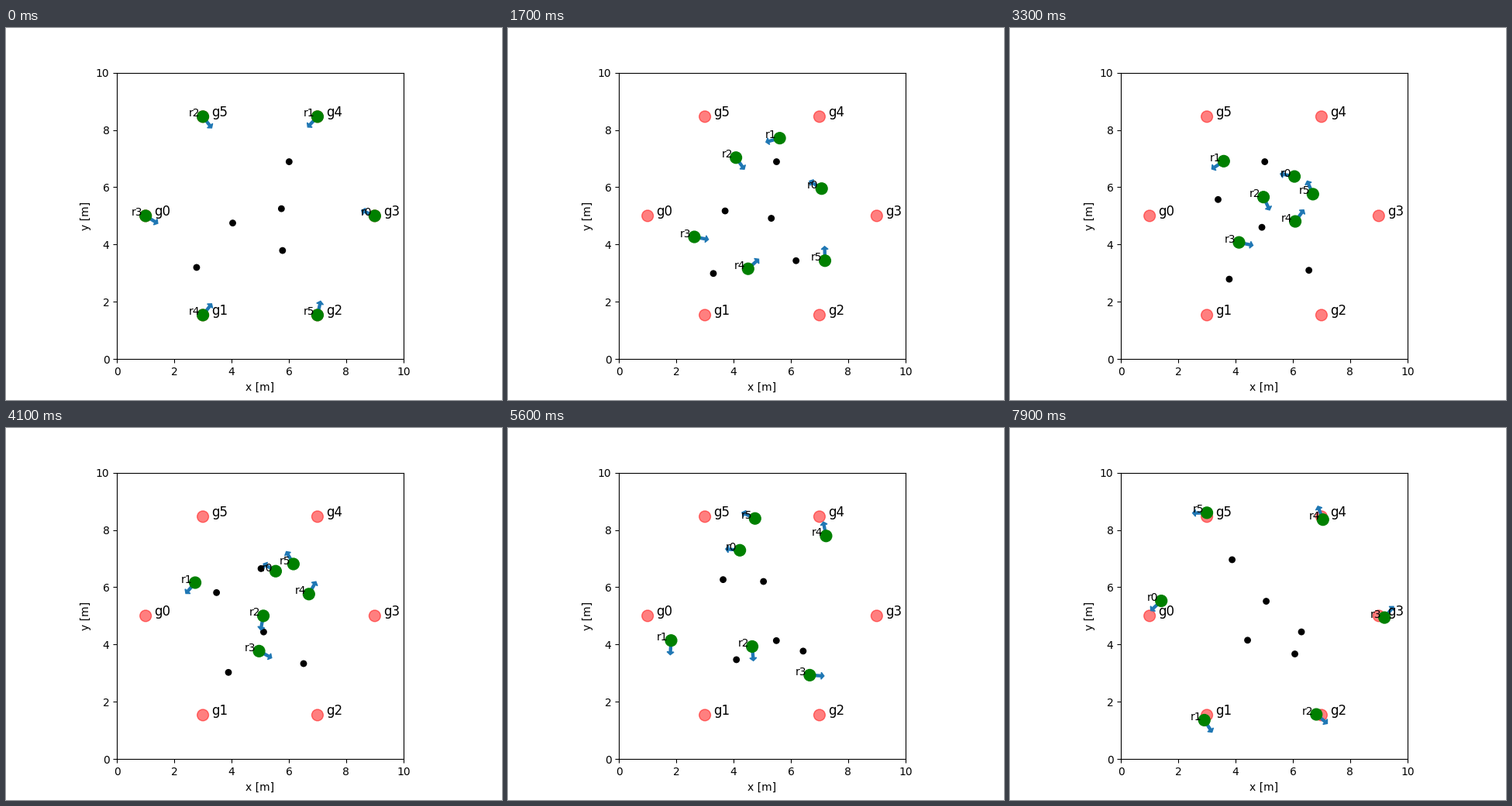
A matplotlib script that plays this animation: 640 px wide and 480 px high, repeating every 8 s.

```python
import numpy as np
import matplotlib.pyplot as plt
from matplotlib.animation import FuncAnimation
from matplotlib.patches import Arrow, Circle

FRAMES, INTERVAL = 80, 100
CRUISE = 1.45  # speed on the last leg, m/s
KNOTS = [0, 0.9, 2.6, 4.1, 5.6]
TURN, END = 3.3, 7.9

# Robots start evenly spaced on a ring and swap sides through these points
VIAS = [
    [(7.83, 5.52), (6.47, 6.28), (5.54, 6.56), (4.22, 7.29), (1.35, 5.47)],
    [(6.45, 8.01), (4.45, 7.35), (2.73, 6.16), (1.82, 4.14), (2.91, 1.36)],
    [(3.59, 7.70), (4.61, 6.27), (5.11, 5.00), (4.65, 3.93), (6.82, 1.56)],
    [(1.90, 4.49), (3.44, 4.17), (4.96, 3.77), (6.66, 2.93), (9.20, 4.94)],
    [(3.71, 2.39), (5.45, 4.05), (6.70, 5.76), (7.23, 7.79), (7.05, 8.36)],
    [(7.15, 2.38), (7.03, 4.78), (6.16, 6.81), (4.75, 8.40), (3.00, 8.60)],
]

# Obstacles drift straight from start to turning point to end
DRIFTS = [
    [(6.01, 6.89), (5.02, 6.89), (5.07, 5.51)],
    [(5.74, 5.25), (4.92, 4.60), (6.07, 3.67)],
    [(4.04, 4.75), (3.39, 5.57), (3.88, 6.96)],
    [(5.78, 3.79), (6.56, 3.10), (6.30, 4.44)],
    [(2.78, 3.20), (3.78, 2.79), (4.42, 4.15)],
]


def on_ring(k):
    a = k * np.pi / 3
    return 5 + 4 * np.cos(a), 5 + 4 * np.sin(a)


class Spline:
    """Natural cubic spline in time; the last leg is driven at cruise speed."""

    def __init__(self, points):
        self.p = np.array(points)
        legs = np.diff(self.p, axis=0)
        self.t = np.array(KNOTS + [KNOTS[-1] + np.hypot(*legs[-1]) / CRUISE])
        h = np.diff(self.t)
        d = legs / h[:, None]
        n = len(self.p)
        a, b = 2 * np.eye(n), np.empty((n, 2))
        a[0, 1] = a[-1, -2] = 1
        b[0], b[-1] = 3 * d[0], 3 * d[-1]
        for i in range(1, n - 1):
            a[i, i - 1:i + 2] = h[i], 2 * (h[i - 1] + h[i]), h[i - 1]
            b[i] = 3 * (h[i] * d[i - 1] + h[i - 1] * d[i])
        self.v = np.linalg.solve(a, b)

    def at(self, t):
        """Position and unit heading; both hold after arrival."""
        t = min(t, self.t[-1])
        i = min(np.searchsorted(self.t, t, side="right") - 1, len(self.t) - 2)
        h = self.t[i + 1] - self.t[i]
        s = (t - self.t[i]) / h
        p0, p1 = self.p[i:i + 2]
        m0, m1 = self.v[i:i + 2] * h
        c2 = 3 * (p1 - p0) - 2 * m0 - m1
        c3 = 2 * (p0 - p1) + m0 + m1
        vel = m0 + 2 * c2 * s + 3 * c3 * s**2
        return p0 + s * (m0 + s * (c2 + s * c3)), vel / np.hypot(*vel)


def drift(t, points):
    return [np.interp(t, [0, TURN, END], axis) for axis in zip(*points)]


def disc(xy, radius, color, **kw):
    return ax.add_patch(Circle(xy, radius, color=color, **kw))


fig, ax = plt.subplots(figsize=(6.4, 4.8), dpi=100)
ax.set_aspect("equal")
ax.set(xlim=(0, 10), ylim=(0, 10), xlabel="x [m]", ylabel="y [m]")

for k in range(6):
    x, y = on_ring(k + 3)
    disc((x, y), 0.2, "r", alpha=0.5, zorder=1)
    ax.text(x + 0.3, y, f"g{k}", fontsize=12, zorder=4)

paths = [Spline([on_ring(k)] + via) for k, via in enumerate(VIAS)]
bodies = [disc((0, 0), 0.2, "g", zorder=3) for _ in paths]
labels = [ax.text(0, 0, f"r{k}", fontsize=10, zorder=4) for k in range(len(paths))]
dots = [disc((0, 0), 0.1, "k", zorder=2) for _ in DRIFTS]
arrows = []


def update(frame):
    t = frame * INTERVAL / 1000
    while arrows:
        arrows.pop().remove()
    for path, body, label in zip(paths, bodies, labels):
        (x, y), (ux, uy) = path.at(t)
        body.center = x, y
        label.set_position((x - 0.5, y))
        arrow = Arrow(x, y, 0.5 * ux, 0.5 * uy, width=0.4, color="C0", zorder=2)
        arrows.append(ax.add_patch(arrow))
    for dot, points in zip(dots, DRIFTS):
        dot.center = drift(t, points)
    return bodies + labels + dots + arrows


anim = FuncAnimation(fig, update, frames=FRAMES, interval=INTERVAL, repeat=True, repeat_delay=0)
plt.show()
```
